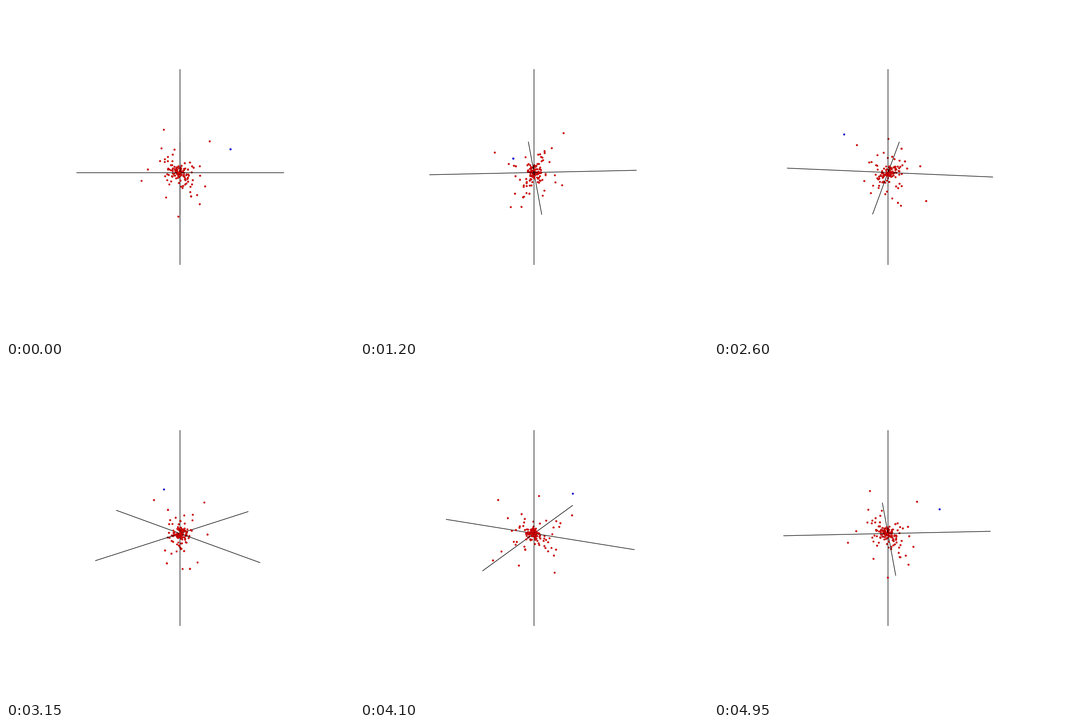
A matplotlib script that plays this animation: 765x732 px, repeating every 5000 ms.

```python
import numpy as np
import matplotlib.pyplot as plt
from matplotlib.animation import FuncAnimation

W, H, DPI = 765, 732, 100
CX, CY = 382.5, 366.0
FRAMES, INTERVAL = 100, 50
HALF = 227.5                    # half length of each axis, in pixels
DIST = 6 * HALF                 # camera distance
TILT = np.radians(20)
PX = 72 / DPI                   # one pixel in points

# Wide-lying points as (x, y, z): right, up, towards the viewer
OUTER = np.array([
    (-36.5, 78, -68), (65, 66, -18), (-41.4, 42, -42.5), (-12.1, 45, -24),
    (-16, 36.5, -14.5), (-44.3, 19, -22), (-69.7, 12.3, 15),
    (-88.6, -40.6, -55), (-31.5, -68.4, -22), (-3.5, -82.8, 52),
    (43.2, -63, 29.8), (37.3, -43, 26), (24.4, -47, 23.5),
    (22.5, -39.3, 17.8), (55.2, -27.7, 13.2), (42.8, 8, 42), (43, 18, 10),
    (9.8, 51, 85), (16.8, 26.8, 55.5), (6, 18.7, 44), (29, 25.5, 40.5),
    (27.5, -6, 32), (24, -39.5, 43), (5.5, -27.8, 22.8), (22.8, -24.5, 24),
    (26.3, -21.3, 17.5), (7, -28, 9.7), (3, -42.3, -23), (-4, -26, -48),
    (-29.6, -43.2, -66), (-34.2, 11.6, -37), (-27, 18.7, -22),
    (-28.7, -14.5, -28), (-33.5, -19.5, -28.5), (-26.5, 32.3, -11),
    (-33.5, 24.5, -18), (-23.7, -32, -10), (-19.7, -26.5, -14),
    (-2.5, -23.5, 3.5), (22, 19, -12), (26.5, 15, 2), (-16.7, 20, -18),
    (14, -19.5, 17), (12, -14.5, 10), (11.5, -26, 6),
])
BLUE = np.array([(105.5, 69, 48)])


def dense_core(count):
    """Random cluster around the centre, falling slightly to the right."""
    rng = np.random.default_rng(7)
    x, y, z = np.clip(rng.normal(size=(3, count)), -2, 2)
    x = 13 * x
    return np.column_stack([x, 8 * y - 0.35 * x, 9 * z])


def project(points, angle):
    """Turn about the vertical axis and return screen x, y, scale, depth."""
    x, y, z = np.asarray(points, float).T
    c, s = np.cos(angle), np.sin(angle)
    x, z = x * c - z * s, x * s + z * c
    near = z * np.cos(TILT) + y * np.sin(TILT)
    scale = DIST / (DIST - near)
    up = (y * np.cos(TILT) - z * np.sin(TILT)) * scale
    return CX + x * scale, CY - up, scale, z


dots = np.vstack([OUTER, dense_core(80), BLUE])
fill = np.array([(0.94, 0, 0)] * (len(dots) - 1) + [(0, 0, 0.94)])
edge = fill * 0.65
ends = HALF * np.eye(3)

fig = plt.figure(figsize=(W / DPI, H / DPI), dpi=DPI, facecolor="white")
ax = fig.add_axes([0, 0, 1, 1])
ax.set_xlim(0, W)
ax.set_ylim(H, 0)
ax.axis("off")

axis_lines = [ax.plot([], [], color="black", lw=1.25 * PX, zorder=2)[0]
              for _ in range(3)]
behind, front = (ax.scatter([], [], linewidths=0.7 * PX, zorder=z)
                 for z in (1, 3))


def fill_layer(layer, mask, x, y, scale):
    layer.set_offsets(np.column_stack([x[mask], y[mask]]))
    layer.set_sizes((3.7 * PX * scale[mask]) ** 2)
    layer.set_facecolor(fill[mask])
    layer.set_edgecolor(edge[mask])


def draw(n):
    angle = 2 * np.pi * n / FRAMES
    for line, end in zip(axis_lines, ends):
        x, y, _, _ = project([-end, end], angle)
        line.set_data(x, y)

    x, y, scale, depth = project(dots, angle)
    # Near the upright axis depth decides; elsewhere the side of the floor plane
    hidden = np.where(np.abs(x - CX) < 4, depth < 0, dots[:, 1] < 0)
    fill_layer(behind, hidden, x, y, scale)
    fill_layer(front, ~hidden, x, y, scale)
    return [behind, front, *axis_lines]


anim = FuncAnimation(fig, draw, frames=FRAMES, interval=INTERVAL,
                     repeat=True, repeat_delay=0)
plt.show()
```
